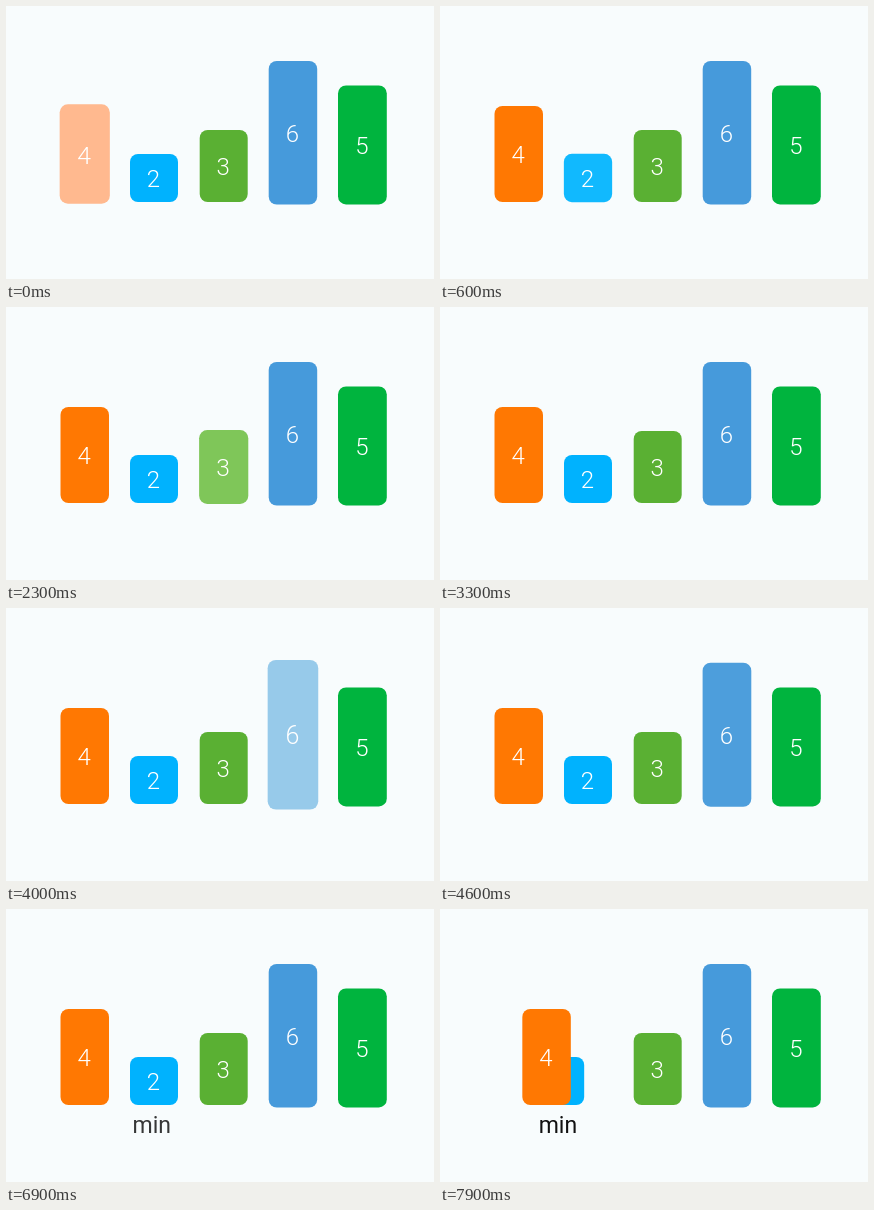
An HTML page with a canvas that plays this animation: 428 px wide and 273 px high, repeating every 8000 ms.

```html
<!DOCTYPE html>
<html lang="en">
<head>
<meta charset="utf-8">
<title>Selection sort</title>
<style>
html, body { margin: 0; width: 100%; height: 100%; overflow: hidden; background: #f8fcfd; }
canvas { display: block; width: 428px; height: 273px; }
</style>
</head>
<body>
<canvas id="stage" width="428" height="273"></canvas>
<script>
const ctx = document.getElementById('stage').getContext('2d');
const LOOP = 8000, STEP = 100;
const FONT = 'Roboto, "Noto Sans", sans-serif';

// base: resting colour, glow: colour at the top of the pulse
const bars = [
  { n: 4, x: 54.5, y: 100, w: 48.5, h: 96, base: [255, 120, 2], glow: [255, 206, 190] },
  { n: 2, x: 124, y: 148, w: 48, h: 48, base: [0, 178, 254], glow: [128, 234, 255] },
  { n: 3, x: 193.7, y: 124, w: 48, h: 72, base: [90, 176, 51], glow: [160, 218, 122] },
  { n: 6, x: 262.7, y: 55, w: 48.5, h: 143.5, base: [70, 154, 219], glow: [157, 205, 235] },
  { n: 5, x: 332, y: 79.4, w: 48.8, h: 119, base: [0, 180, 62], glow: [0, 238, 200] }
];

const PERIOD = 1400, RISE = 750, FALL = 600, PEAK = -150, GROW = 0.046;
const clamp = v => Math.max(0, Math.min(1, v));
const ease = u => (1 - Math.cos(Math.PI * clamp(u))) / 2;

function pulse(i, t) {
  const d = t - (PEAK + i * PERIOD);
  return clamp(d < 0 ? 1 + d / RISE : 1 - d / FALL);
}

function label(text, x, y, size, weight, color) {
  ctx.font = `${weight} ${size}px ${FONT}`;
  ctx.textAlign = 'center';
  ctx.textBaseline = 'alphabetic';
  ctx.fillStyle = color;
  ctx.fillText(text, x, y);
}

function drawBar(i, t, dx) {
  const { n, x, y, w, h, base, glow } = bars[i];
  const p = pulse(i, t), s = 1 + GROW * p;
  const color = base.map((c, k) => Math.round(c + (glow[k] - c) * p));
  ctx.save();
  ctx.translate(x + w / 2 + dx, y + h / 2);
  ctx.scale(s, s);
  ctx.fillStyle = `rgb(${color})`;
  ctx.beginPath();
  ctx.roundRect(-w / 2, -h / 2, w, h, 8);
  ctx.fill();
  label(n, -0.6, 9.2, 24, 300, '#fff');
  ctx.restore();
}

function draw(t) {
  ctx.fillStyle = '#f8fcfd';
  ctx.fillRect(0, 0, 428, 273);
  const shift = 69.5 * ease((t - 7330) / 1307);
  for (let i = 1; i < bars.length; i++) drawBar(i, t, i === 1 ? -shift : 0);
  drawBar(0, t, shift);
  ctx.globalAlpha = clamp((t - 6120) / 930);
  label('min', 145.7 - shift, 224, 23, 400, '#111');
  ctx.globalAlpha = 1;
}

function frame() {
  const t = performance.now() % LOOP;
  draw(Math.floor(t / STEP) * STEP);
  requestAnimationFrame(frame);
}
frame();
</script>
</body>
</html>
```
